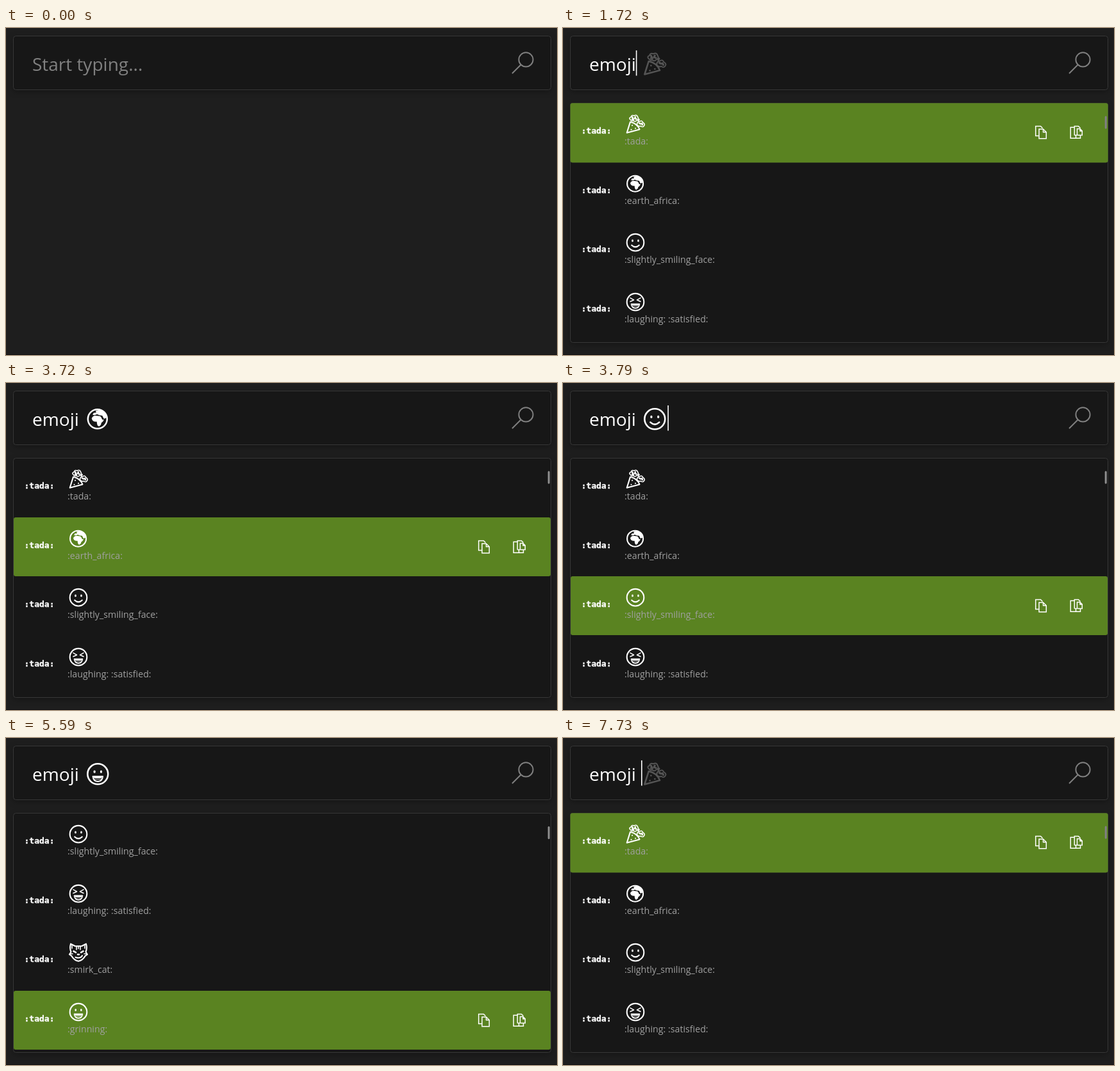
Recreate the animation shown at these times as an HTML page. Size 860x511 px, loop 8000 ms.

```html
<!DOCTYPE html>
<html lang="en">
<head>
<meta charset="utf-8">
<title>Launcher search</title>
<style>
  html, body { margin: 0; width: 100%; height: 100%; overflow: hidden; background: #1e1e1e; }
  svg { display: block; width: 860px; height: 511px; font-family: "Open Sans", "Noto Sans", sans-serif; }
  text { white-space: pre; }
  .box { fill: #171717; stroke: #373737; filter: drop-shadow(0 3px 5px rgba(0, 0, 0, .28)); }
  .query { font-size: 28px; fill: #fff; }
  .hint { fill: #808080; }
  .ghost { fill: #555; color: #555; }
  .title { font-size: 23.6px; font-weight: 450; fill: #fff; }
  .title .hit { font-weight: 600; }
  .sub { font-size: 14.2px; fill: #a0a0a0; }
  .tag { font: bold 13px "DejaVu Sans Mono", monospace; fill: #fff; stroke: #fff; stroke-width: .3; }
  .line { fill: none; stroke: currentColor; stroke-linecap: round; stroke-linejoin: round; stroke-width: 2.1; }
  .fine { stroke-width: 1.6; }
  .dots { stroke-width: 2.6; }
  .solid { fill: currentColor; stroke: none; }
  .tool { fill: none; stroke: #fff; stroke-width: 1.5; }
  .white { color: #fff; }
</style>
</head>
<body>
<svg viewBox="0 0 860 511">
  <defs>
    <circle id="face" class="line" r="13.3"/>
    <g id="mouth" class="line fine">
      <path d="M-6.500 3H6.500Q5.800 9.700 0 9.700T-6.500 3Z"/>
      <path class="solid" d="M-5.500 3.200H5.500L4.800 5.600H-4.800Z"/>
      <path d="M-4.500 7H4.500" stroke-width=".6"/>
    </g>
    <g id="tada" class="line">
      <path d="M-13.300 13.500L-8-3.500Q2.500-1.500 6.500 8.200Z"/>
      <g class="fine">
        <path d="M-7.500-6.500Q-11-9.500-7-11Q-6-15-2-13.200Q2.500-15.500 3.700-11Q6-7.500 2-5.800Q-.500-2.800-3.500-5.500Q-5.500-4-7.500-6.500Z"/>
        <path d="M2.500 1Q2.500-3.800 6.500-4Q10-6.500 11.800-2.500Q16 0 13.200 3Q11 5.500 8.500 3Q4.500 4.500 2.500 1Z"/>
      </g>
      <path class="dots" d="M-5-11l1 2M0-11l-1 2M-5-7.500h2M1-8h.5M6-1.500l2 1M10-1l1 2M4.500-5.500l1-1.500"/>
      <path d="M-6.500 8.500h.1M-5 2h.1M0 6.500h.1"/>
    </g>
    <g id="earth">
      <circle class="line" r="12.5" cx="-.4"/>
      <path class="solid" d="M-8-.8Q-6.500-4.500-3-4.500L3-3.800Q5-2 5.800.7L8 .8Q7 3.800 4.600 5Q4.200 8.400 1.400 9.600Q-1.200 9-1.300 3.500Q-6.800 4.200-8-.8ZM-6.800-5.500L-5.500-8-2-8.300-3-10.500 1-12 6-10.700 10.500-6.300 11-1.500 8-.3 5.800-4.500 2-5-1-6.200-4-5Z"/>
    </g>
    <g id="smile">
      <use href="#face"/>
      <path class="line" d="M-5.800 4.200Q0 9.600 5.800 4.200"/>
      <path class="line dots" d="M-4.500-3.300v1M4.500-3.300v1"/>
    </g>
    <g id="laugh">
      <use href="#face"/>
      <path class="line fine" d="M-8-6.300L-2.500-3.300-8-.8M8-6.300L2.500-3.300 8-.8"/>
      <use href="#mouth"/>
    </g>
    <g id="grin">
      <use href="#face"/>
      <path class="line dots" d="M-4.300-3.600v1M4.300-3.600v1"/>
      <use href="#mouth"/>
    </g>
    <g id="smiley">
      <use href="#face"/>
      <path class="line dots" d="M-4.300-5.300v2.600M4.300-5.300v2.600"/>
      <use href="#mouth"/>
    </g>
    <g id="cat" class="line">
      <path d="M-12-13.500L-5-10H5L12-13.500Q14-7 11.500-1L14 3 10.500 5.500Q7 12 0 13.500Q-7 12-10.500 5.500L-14 3-11.500-1Q-14-7-12-13.500Z"/>
      <path class="fine" d="M-3-9.500v5M0-9.500v3.500M3-9.500v5M-10-10.500v4M10-10.500v4M-12 2h3M12 2h-3"/>
      <path class="dots" d="M-7.500-2l3.500 2M7.500-2L4 0M-1 3h2"/>
      <path d="M-4.500 7.500Q3 10 6 5"/>
    </g>
    <g id="copy" class="tool"><path d="M-3 5.500H-8.300V-9.500H-.5L2.500-6.500M-3-5H3.500L8.300-.2V9.700H-3ZM3.500-5V-.2H8.300"/></g>
    <g id="paste" class="tool"><path d="M-3.500-7.700H-8.800V9.200H-.5M-2.700 4.500V-9.500H3.500L6.500-6.500M-2.700 4.500H1M1.500 4.500V-5.500H6L9.300-2.200V4.500H1.500M6-5.500V-2H9.300M-.5 4.500V9.200H6.500V4.500"/></g>
    <g id="admin" class="tool"><path d="M-1 2.800H-9.700V-7.700H7.700V-5M4-3.500Q6.500-1.800 9.500-1.800V3Q9 7 4 9Q-1 7-1 3V-1.800Q2-1.800 4-3.500Z"/></g>
    <g id="user" class="tool"><path d="M-1 2.800H-9.700V-7.700H7.700V-4M-.5 9.500Q0 4.500 4.700 4.500T9.700 9.500"/><circle cx="4.700" cy="1" r="3.300"/></g>
    <g id="folder" class="tool"><path d="M-6.500-9.200H6.500V2L7.500 4V8.200H-1M-6.500-9.200V6L-1.500 9.500V-5.500L-6.500-9.200"/></g>
    <g id="shell">
      <path class="tool" d="M-9.300-8.500H9.300V7.800H-9.300ZM-9.300-5.500H9.300"/>
      <text x="-6.500" y="4.500" fill="#fff" font-size="8" font-family="DejaVu Sans Mono, monospace">C:\</text>
    </g>
  </defs>

  <rect width="860" height="511" fill="#1e1e1e"/>
  <rect class="box" x="11.500" y="12.500" width="839" height="84" rx="4"/>
  <g fill="none" stroke="#808080" stroke-width="1.900">
    <circle cx="811.500" cy="49.400" r="11.100"/>
    <path d="M803.500 57.500L790 71"/>
  </g>
  <g id="input"></g>
  <g id="panel"></g>
  <rect id="caret" y="35" width="1.600" height="39.500" fill="#fff"/>
  <path d="M0 510.500H860" stroke="#120f12"/>
</svg>

<script>
const LOOP = 8000, ROW = 92.5;
const $ = id => document.getElementById(id);

const apps = [
  ['Ezlor', '<rect x="30" y="140" width="44" height="44" fill="#1f8653"/>'],
  ['Murvasolt Enna', '<circle cx="52.300" cy="161.500" r="22.700" fill="#1c86cf"/>'],
  ['Euna Plays Launcher', '<rect x="33" y="142" width="39" height="39" fill="#090909"/>'],
  ['Entry Reader', '<rect x="36" y="146" width="31" height="31" fill="#a9bccb"/>']
];
const emoji = [
  ['tada', ':tada:'],
  ['earth', ':earth_africa:'],
  ['smile', ':slightly_smiling_face:'],
  ['laugh', ':laughing: :satisfied:'],
  ['cat', ':smirk_cat:'],
  ['grin', ':grinning:'],
  ['smiley', ':smiley:']
];
const caretAt = { '': 40.5, e: 55.8, em: 82, emo: 99, emoj: 106.3, emoji: 113.8, 'emoji ': 122 };

// Each step changes part of the state; list: null, 'apps' or first emoji row.
const steps = [
  [0, { text: '', ghost: '', icon: '', caret: 0, list: null, sel: 0 }],
  [410, { caret: 1 }],
  [740, { text: 'e' }],
  [800, { list: 'apps' }],
  [870, { ghost: 'zlor' }],
  [920, { text: 'em', ghost: '' }],
  [1150, { text: 'emo' }],
  [1400, { text: 'emoj' }],
  [1620, { text: 'emoji' }],
  [1680, { list: 0 }],
  [1720, { ghost: 'tada' }],
  [2150, { caret: 0 }],
  [2640, { caret: 1 }],
  [3150, { caret: 0 }],
  [3180, { text: 'emoji ', ghost: '', icon: 'earth', sel: 1, caret: 1 }],
  [3720, { caret: 0 }],
  [3790, { icon: 'smile', sel: 2, caret: 1 }],
  [4300, { icon: 'laugh', sel: 3 }],
  [4330, { caret: 0 }],
  [4820, { caret: 1 }],
  [4950, { icon: 'cat', list: 1 }],
  [5310, { caret: 0 }],
  [5590, { icon: 'grin', list: 2 }],
  [5890, { caret: 1 }],
  [6150, { icon: 'smiley', list: 3 }],
  [6400, { caret: 0 }],
  [6890, { caret: 1 }],
  [7500, { icon: '' }],
  [7630, { list: 0, sel: 0 }],
  [7730, { ghost: 'tada' }]
];
let last = {};
const states = steps.map(([at, patch]) => last = { ...last, ...patch, at });

const use = (id, x, y, scale = 1) =>
  `<use href="#${id}" transform="translate(${x} ${y}) scale(${scale})"/>`;

function drawInput(s) {
  if (!s.text) return '<text class="query hint" x="41" y="67">Start typing...</text>';
  const isTada = s.ghost === 'tada';
  const tail = isTada ? '' : `<tspan class="ghost">${s.ghost}</tspan>`;
  let out = `<text class="query" x="41" y="67">${s.text}${tail}</text>`;
  if (isTada) out += `<g class="ghost">${use('tada', 143.3, 56.3, 1.2)}</g>`;
  if (s.icon) out += `<g class="white">${use(s.icon, 143.3, 56.3, 1.2)}</g>`;
  return out;
}

function drawRow(s, i) {
  const isApp = s.list === 'apps';
  let out = '';
  if (i === s.sel) {
    const tools = isApp ? ['admin', 'user', 'folder', 'shell'] : ['copy', 'paste'];
    // The first row covers the panel border.
    out += i === 0
      ? '<rect x="11.5" y="117.5" width="839" height="92.5" rx="3" fill="#5a8321" stroke="#4c6628"/>'
        + '<rect x="12" y="118" width="838" height="92" rx="3" fill="#5a8321"/>'
      : '<rect x="12" y="117" width="838" height="92" rx="3" fill="#5a8321"/>';
    out += tools.map((id, k) => use(id, 801 - 55 * (tools.length - 1 - k), 163)).join('');
  }
  if (isApp) {
    const [name, mark] = apps[i];
    out += mark + `<text class="title" x="96" y="159">${name.replace('E', '<tspan class="hit">E</tspan>')}</text>`;
    out += '<text class="sub" x="96" y="181.7">Application</text>';
  } else {
    const [id, label] = emoji[s.list + i];
    out += '<text class="tag" x="28.5" y="165.3">:tada:</text>' + use(id, 113, 150.2);
    out += `<text class="sub" x="96" y="181.7">${label}</text>`;
  }
  return `<g transform="translate(0 ${Math.round(i * ROW)})">${out}</g>`;
}

function drawPanel(s) {
  if (s.list === null) return '';
  const top = 137.5 + (s.list > 0 ? s.list * .3 : 0);
  return '<rect class="box" x="11.5" y="117.5" width="839" height="374" rx="4"/><g class="white">'
    + [0, 1, 2, 3].map(i => drawRow(s, i)).join('')
    + `</g><rect x="845.7" y="${top}" width="3" height="20" rx="1.5" fill="${s.sel ? '#8e8e8e' : '#827f85'}"/>`;
}

let shown = null;
const start = performance.now();
function frame() {
  const t = Math.max(0, performance.now() - start) % LOOP;
  const s = states.findLast(state => state.at <= t);
  if (s !== shown) {
    $('input').innerHTML = drawInput(s);
    $('panel').innerHTML = drawPanel(s);
    $('caret').setAttribute('x', s.icon ? 163.3 : caretAt[s.text]);
    $('caret').setAttribute('opacity', s.caret);
    shown = s;
  }
  requestAnimationFrame(frame);
}
frame();
</script>
</body>
</html>
```
